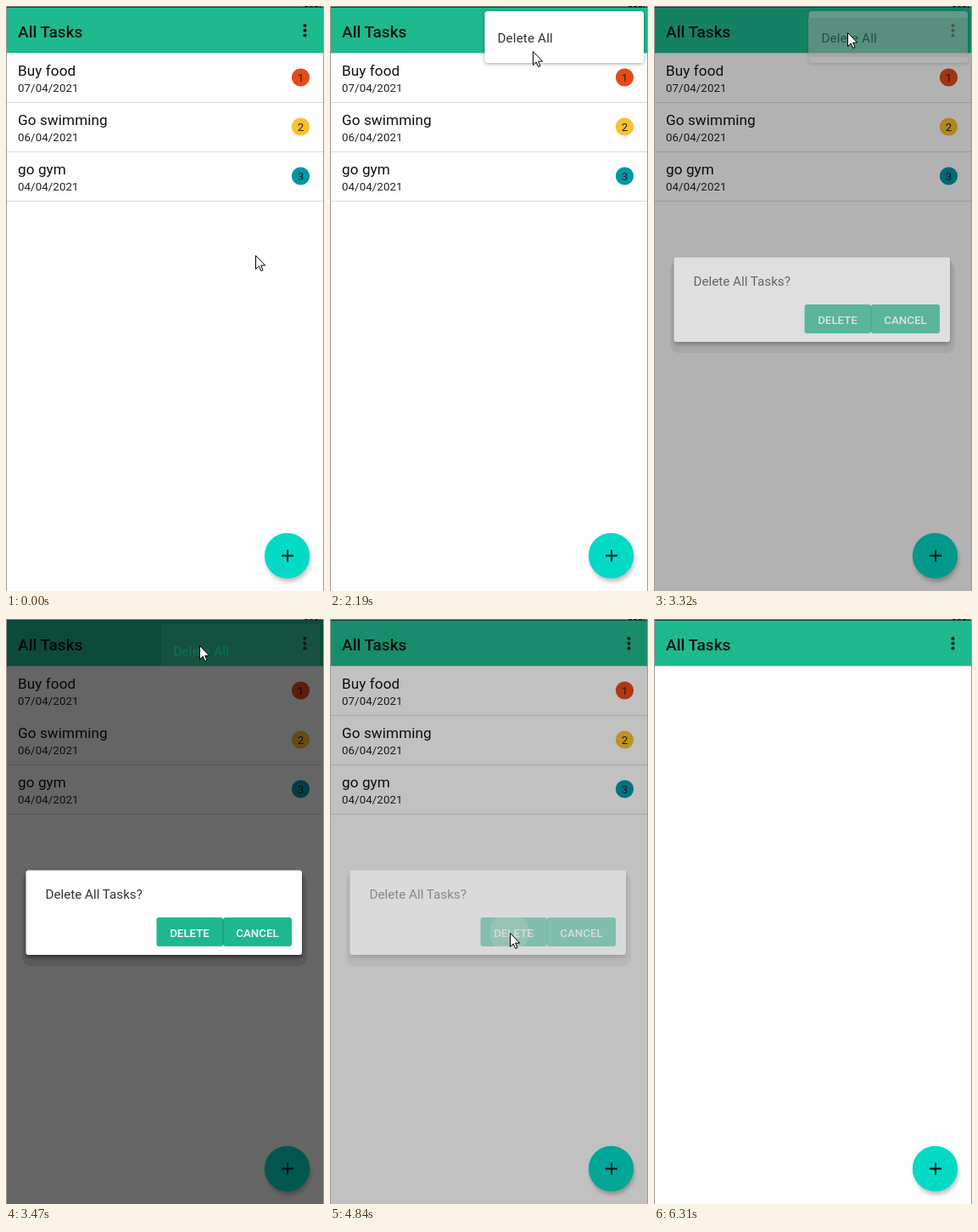
Write an HTML page that moves like this. It is 375 by 688 pixels and loops after 6620 ms.

```html
<!DOCTYPE html>
<html lang="en">
<head>
<meta charset="utf-8">
<title>All Tasks</title>
<style>
  html, body { margin: 0; width: 100%; height: 100%; overflow: hidden; background: #fefefe; }
  svg { display: block; width: 375px; height: 688px; font-family: Roboto, sans-serif; }
  .title { font-size: 19px; font-weight: 500; fill: #06150f; }
  .name { font-size: 17.1px; letter-spacing: .1px; fill: #111; }
  .date { font-size: 13.3px; letter-spacing: .08px; fill: #222; }
  .num { font-size: 13.3px; text-anchor: middle; fill: #222; }
  .item { font-size: 15.2px; letter-spacing: .15px; fill: #333; }
  .ask { font-size: 15.2px; fill: #333; }
  .button { font-size: 13.3px; font-weight: 500; text-anchor: middle; fill: #fff; }
  .soft { filter: drop-shadow(0 1px 2px rgba(0, 0, 0, .35)); }
  #menu { transform-origin: 370px 6px; }
</style>
</head>
<body>
<svg viewBox="0 0 375 688">
  <defs>
    <clipPath id="itemClip"><rect x="182" y="14" width="188" height="46"/></clipPath>
    <clipPath id="deleteClip"><rect x="177.500" y="351" width="78.500" height="34" rx="3"/></clipPath>
    <filter id="blur" x="-30%" y="-30%" width="160%" height="160%"><feGaussianBlur stdDeviation="2.500"/></filter>
  </defs>

  <rect width="375" height="688" fill="#fefefe"/>
  <rect y="55" width="375" height="1" fill="#c9ddd6"/>
  <rect y="1" width="375" height="54" fill="#1eb98e"/>
  <text class="title" x="14" y="36.500">All Tasks</text>
  <circle id="dotRipple" cx="352.500" cy="28.500" r="18" fill="#000" fill-opacity=".13"/>
  <g fill="#06150f">
    <circle cx="352.500" cy="23" r="2"/>
    <circle cx="352.500" cy="28.800" r="2"/>
    <circle cx="352.500" cy="34.500" r="2"/>
  </g>

  <g id="rows"></g>

  <circle cx="333" cy="651" r="26" fill="#000" opacity=".25" filter="url(#blur)"/>
  <circle cx="331.500" cy="646.500" r="26.700" fill="#03dac5"/>
  <path d="M325 646.500h14M332 639.500v14" stroke="#06150f" stroke-width="2"/>

  <g id="menu">
    <rect class="soft" x="182.500" y="6" width="187.500" height="61" rx="3.500" fill="#fff"/>
    <g clip-path="url(#itemClip)">
      <circle id="itemRipple" cx="276" cy="37" r="88" fill="#dfdfdf"/>
      <rect id="itemFill" x="182" y="14" width="188" height="46" fill="#dfdfdf"/>
    </g>
    <text class="item" x="197.500" y="42.500">Delete All</text>
  </g>

  <rect id="dim" y="1" width="375" height="687" fill="#000" fill-opacity=".6"/>

  <g id="ghost">
    <rect x="183" y="6" width="187" height="49" fill="#fff" fill-opacity=".04"/>
    <text class="item" x="197.500" y="42.500" style="fill:#087358">Delete All</text>
  </g>

  <g id="dialog">
    <rect x="19" y="300" width="336" height="108" rx="10" fill="#000" fill-opacity=".1"/>
    <rect x="24" y="298" width="325" height="100" rx="4" fill="#000" opacity=".45" filter="url(#blur)"/>
    <rect x="23.500" y="295.500" width="325.500" height="99.500" rx="3" fill="#fefefe"/>
    <text class="ask" x="46.500" y="329">Delete All Tasks?</text>
    <rect x="177.500" y="351" width="78.500" height="34" rx="3" fill="#1eb88e"/>
    <rect x="256" y="351" width="81" height="34" rx="3" fill="#1eb88e"/>
    <path d="M256 353v30" stroke="#17936f"/>
    <g clip-path="url(#deleteClip)">
      <circle id="deleteRipple" cx="211.500" cy="368.500" r="23.500" fill="#fff" fill-opacity=".24"/>
    </g>
    <text class="button" x="216.500" y="373.500">DELETE</text>
    <text class="button" x="296.500" y="373.500">CANCEL</text>
  </g>

  <rect width="375" height="1" fill="#888"/>
  <rect x="1" y="1" width="373" height="1" fill="#123c31"/>
  <path d="M352 .500h19" stroke="#222" stroke-dasharray="4 2"/>
  <path d="M.500 0v688M374.500 0v688" stroke="#9a9a9a"/>

  <path id="cursor" d="M.500.500v16l3.700-3.600 2.500 5.600 2.300-1-2.400-5.400h5z" fill="#fff" stroke="#000"/>
</svg>
<script>
  const LOOP = 6620;
  const $ = id => document.getElementById(id);

  const tasks = [
    ["Buy food", "07/04/2021", "#e64a19"],
    ["Go swimming", "06/04/2021", "#fbc02d"],
    ["go gym", "04/04/2021", "#0097a7"]
  ];
  $("rows").innerHTML = tasks.map(([name, date, color], i) => `
    <g transform="translate(0 ${55 + i * 58})">
      <text class="name" x="14" y="26.5">${name}</text>
      <text class="date" x="14" y="46">${date}</text>
      <circle cx="347.5" cy="29" r="10.6" fill="${color}"/>
      <text class="num" x="347.5" y="34">${i + 1}</text>
      <rect id="line${i}" y="58" width="375" height="1" fill="#dcdcdc"/>
    </g>`).join("");

  // Each step is [time, value] and holds until the next one.
  function play(id, prop, steps) {
    const frames = steps.map(([t, v]) => ({ offset: t / LOOP, [prop]: v, easing: "steps(1, end)" }));
    frames.push({ offset: 1, [prop]: steps[steps.length - 1][1] });
    $(id).animate(frames, { duration: LOOP, iterations: Infinity });
  }
  const fade = (id, ...steps) => play(id, "opacity", [[0, 0], ...steps]);

  const path = [
    [0, 294, 293], [280, 292, 255], [400, 288, 103], [550, 336, 1],
    [700, 350, 10], [830, 358, 19], [950, 361, 23],
    [1950, 340, 31], [2070, 285, 48], [2190, 239, 53],
    [2340, 232, 43], [2460, 228, 34], [2610, 228, 31],
    [3900, 231, 150], [4020, 224, 309], [4170, 215, 354], [4290, 212, 369],
    [5800, 222, 388], [5920, 258, 465], [6040, 306, 590], [6160, 342, 686]
  ];
  play("cursor", "transform", path.map(([t, x, y]) => [t, `translate(${x}px, ${y}px)`]));
  play("cursor", "opacity", [[0, 1], [6310, 0]]);

  fade("dotRipple", [1500, 1], [1810, 0]);
  fade("menu", [1810, .8], [1950, 1], [3320, .5], [3470, 0]);
  play("menu", "transform", [[0, "scale(.85, .92)"], [1950, "scale(1)"]]);
  fade("itemRipple", [3030, 1], [3470, 0]);
  fade("itemFill", [3170, 1], [3470, 0]);

  fade("dim", [3320, .5], [3470, 1], [4840, .4], [4990, 0]);
  fade("ghost", [3470, 1], [3590, 0]);
  fade("dialog", [3320, .6], [3470, 1], [4840, .4], [4990, 0]);
  fade("deleteRipple", [4690, 1], [4990, 0]);
  play("rows", "opacity", [[0, 1], [4990, 0]]);
  play("line0", "opacity", [[0, 1], [3470, 0], [4840, 1]]);
</script>
</body>
</html>
```
